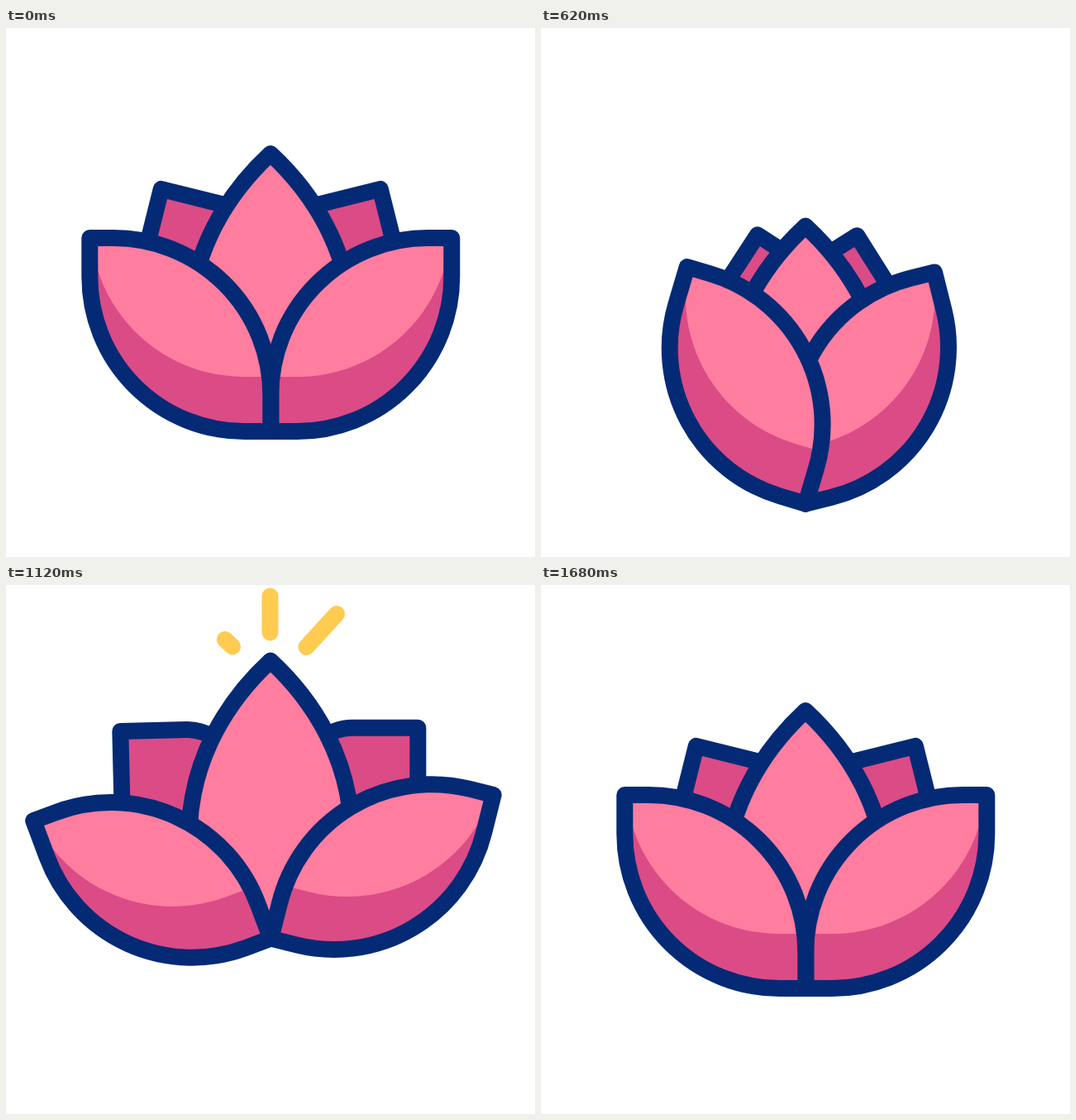
An HTML page for the animation above (2.4 s loop, 640x640 px).

```html
<!DOCTYPE html>
<html lang="en">
<head>
<meta charset="utf-8">
<title>Lotus</title>
<style>
  html, body { margin: 0; width: 100%; height: 100%; overflow: hidden; background: #fff; }
  svg { display: block; width: 100%; height: 100%; }
  .line { stroke: #042a76; stroke-width: 20; stroke-linejoin: round; stroke-linecap: round; }
  .none { fill: none; }
  .light { fill: #ff7d9f; }
  .dark { fill: #db4b86; }
  .ray { stroke: #ffcb50; stroke-width: 20; stroke-linecap: round; }
</style>
</head>
<body>
<svg viewBox="0 0 640 640">
  <defs>
    <!-- Petals are drawn on the left side, relative to their pivot. -->
    <path id="outline" d="M-219 -234H-190A190 190 0 0 1 0 -44V0H-32A187 187 0 0 1 -219 -187Z"/>
    <g id="front">
      <use href="#outline" class="dark"/>
      <path class="light" d="M-219 -234H-190A190 190 0 0 1 0 -44V-66H-32C-115 -66 -185 -120 -209 -194L-219 -220Z"/>
      <use href="#outline" class="line none"/>
    </g>
    <path id="back" class="line dark" d="M-178 -166H-98C-45 -166 0 -88 0 0C-100 0 -178 -40 -178 -82Z"/>
  </defs>
  <g id="flower">
    <g id="backLeft"><use href="#back"/></g>
    <g id="backRight"><use href="#back"/></g>
    <path class="line light" d="M320 152C266 202 226 270 222 352C222 400 270 460 320 488C370 460 418 400 418 352C414 270 374 202 320 152Z"/>
    <g id="frontRight"><use href="#front"/></g>
    <g id="frontLeft"><use href="#front"/></g>
  </g>
  <line id="rayRight" class="ray"/>
  <line id="rayMiddle" class="ray"/>
  <line id="rayLeft" class="ray"/>
</svg>
<script>
const LOOP = 2400, STEP = 20, CX = 320.3;
const el = id => document.getElementById(id);
const smooth = s => s * s * (3 - 2 * s);
const progress = (t, a, b) => smooth(Math.min(1, Math.max(0, (t - a) / (b - a))));

// Eased interpolation through [time, value] keys
function track(t, keys) {
  let value = keys[0][1];
  for (let i = 1; i < keys.length; i++) {
    const [a, from] = keys[i - 1], [b, to] = keys[i];
    value += (to - from) * progress(t, a, b);
  }
  return value;
}

const swing = (times, inward, outward) =>
  times.map((time, i) => [time, [0, inward, outward, 0][i]]);

const FRONT = [0, 520, 1050, 1620], BACK = [88, 585, 1165, 1680];
const bob = swing([0, 525, 1105, 1685], 99, -60.5);

const petals = [
  { id: "backLeft", y: 399, tilt: 14, side: 1, keys: swing(BACK, 19.5, -16) },
  { id: "backRight", y: 399, tilt: 14, side: -1, keys: swing(BACK, 18.6, -14.6) },
  { id: "frontRight", y: 488, tilt: 0, side: -1, keys: swing(FRONT, 17, -14.7) },
  { id: "frontLeft", y: 488, tilt: 0, side: 1, keys: swing(FRONT, 20.4, -21.4) }
];

// Each ray grows from its base, then its base follows to the tip
const rays = [
  { id: "rayRight", base: [363.5, 75], tip: [400, 35], grow: 880, shrink: 1140 },
  { id: "rayMiddle", base: [319.5, 57.5], tip: [319.5, 13.5], grow: 980, shrink: 1253 },
  { id: "rayLeft", base: [274, 74.5], tip: [228, 31], grow: 1080, shrink: 1520 }
];
const RAY_TIME = 140;

function drawRay({ id, base, tip, grow, shrink }, t) {
  const end = progress(t, grow, grow + RAY_TIME);
  const start = progress(t, shrink, shrink + RAY_TIME);
  const at = (axis, p) => base[axis] + (tip[axis] - base[axis]) * p;
  const line = el(id);
  line.setAttribute("x1", at(0, start));
  line.setAttribute("y1", at(1, start));
  line.setAttribute("x2", at(0, end));
  line.setAttribute("y2", at(1, end));
  line.style.display = end > start ? "" : "none";
}

function render(t) {
  el("flower").setAttribute("transform", `translate(0 ${track(t, bob)})`);
  for (const { id, y, tilt, side, keys } of petals) {
    el(id).setAttribute("transform",
      `translate(${CX} ${y}) scale(${side} 1) rotate(${tilt + track(t, keys)})`);
  }
  rays.forEach(ray => drawRay(ray, t));
}

const begin = performance.now();
function tick() {
  const t = (performance.now() - begin) % LOOP;
  render(Math.floor(t / STEP) * STEP);
  requestAnimationFrame(tick);
}
tick();
</script>
</body>
</html>
```
